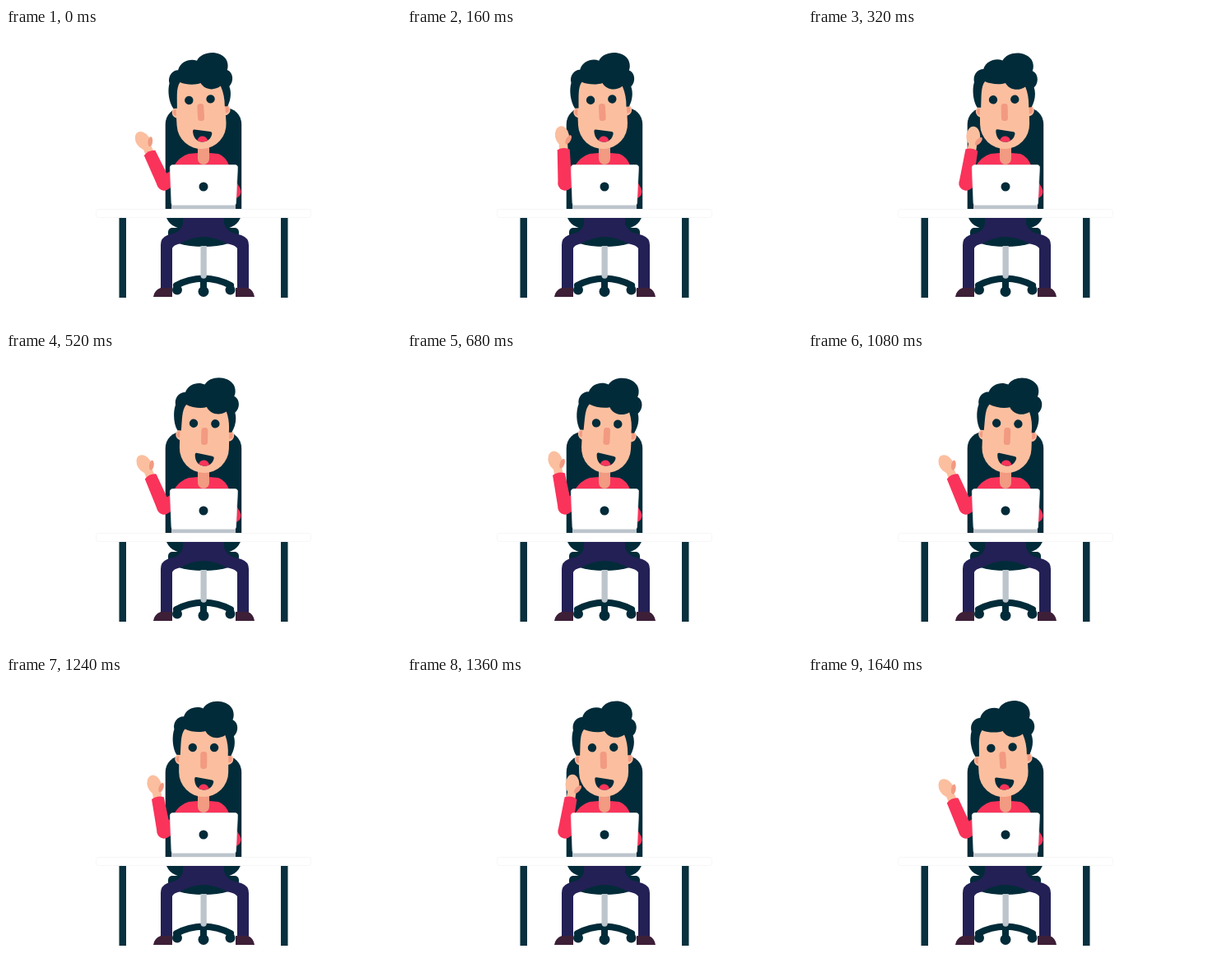
Write an HTML page that moves like this. It is 480x360 px and loops after 1.68 s.

```html
<!DOCTYPE html>
<html lang="en">
<head>
<meta charset="utf-8">
<title>Waving from the desk</title>
<style>
  html, body { margin: 0; width: 100%; height: 100%; overflow: hidden; background: #fff; }
  svg { display: block; width: 100vw; height: 100vh; }
  .dark { fill: #022b39; }
  .skin { fill: #fbbf9f; }
  .shade { fill: #f29a82; }
  .red { fill: #fa335a; }
  .navy { fill: #232055; }
  .shoe { fill: #3d1f38; }
  .grey { fill: #bcc5cc; }
  .sleeve { fill: none; stroke: #fa335a; stroke-width: 17; stroke-linecap: round; }
  .base { fill: none; stroke: #022b39; stroke-width: 8; stroke-linecap: round; }
</style>
</head>
<body>
<svg viewBox="0 0 480 360">
  <defs>
    <path id="lips" d="M231 123 L250 126.500 Q252.500 127 252 129.500 C250.500 135.500 246 139 239.500 138.500
      C232.500 138 229 132 229 125 Q229 122.700 231 123 Z"/>
    <clipPath id="mouth"><use href="#lips"/></clipPath>
  </defs>

  <!-- chair -->
  <rect class="dark" x="193.700" y="97" width="92.500" height="146.500" rx="20"/>
  <rect class="dark" x="197" y="243" width="86" height="12" rx="5"/>
  <ellipse class="dark" cx="240" cy="252" rx="43" ry="14"/>
  <path class="base" d="M207 313 Q222 305 240 304.500 Q258 305 273 313 M240 305 V318"/>
  <circle class="dark" cx="208" cy="318.500" r="6"/>
  <circle class="dark" cx="272.500" cy="318.500" r="6"/>
  <circle class="dark" cx="240" cy="320.500" r="6.500"/>
  <path class="grey" d="M236.500 265 H243.800 V301 A3.650 3.650 0 0 1 236.500 301 Z"/>

  <!-- legs -->
  <path class="navy" d="M215 228 H265 V238 Q268 246 275 249 L286 252 Q295 255 295 264 V318 H281 V268
    Q279 264 268 262 Q254 254 240 254 Q226 254 212 262 Q203 264 202 268 V318 H188 V264
    Q188 255 196 252 L206 249 Q213 246 215 238 Z"/>
  <path class="shoe" d="M179 327 Q180 319 188 316 H202 V327 Z M302 327 Q301 319 294 316 H279 V327 Z"/>

  <!-- body -->
  <path class="red" d="M203 215 V169 Q211 156 222 153 L233 152 H247 L258 153 Q267 156 272 169 V215 Z"/>
  <path class="sleeve" d="M262 173 L277 199"/>
  <path class="sleeve" d="M192 189 L214 175"/>
  <path class="shade" d="M233 138 H247 V159 A7 7 0 0 1 233 159 Z"/>

  <g id="arm">
    <path class="skin" d="M-5.500 -38 L-5 -53 H5 L5.500 -38 Z"/>
    <ellipse class="skin" cx="-1" cy="-58" rx="8.500" ry="12" transform="rotate(-8 0 -58)"/>
    <ellipse class="shade" cx="6.500" cy="-53" rx="2.800" ry="6" transform="rotate(32 6.500 -53)"/>
    <path class="red" d="M-7.500 -41 Q0 -45 7.500 -41 L8.500 0 A8.500 8.500 0 0 1 -8.500 0 Z"/>
  </g>

  <g id="head">
    <circle class="skin" cx="212" cy="101" r="7"/>
    <circle class="skin" cx="269" cy="101" r="7"/>
    <circle class="shade" cx="210.500" cy="101" r="4"/>
    <circle class="shade" cx="270.500" cy="101" r="4"/>
    <path class="skin" d="M210 62 H270 V117 A30 30 0 0 1 210 117 Z"/>
    <path class="dark" d="M207 96 C202 88 201 74 204 65 C202 56 209 49 215.500 49.500 C219 39 231 36 239 39.500
      C245 28.500 266 27.500 274 39 C276.500 43 277 49 275 53 C282 56 283 67 276.500 73 C279 81 277 90 273 97
      H269.500 C270 88 269 80 266 72 C257 78 246 75 242 67 C235 69 224 68 217 64.500
      C211.500 71 212.500 84 211.500 96 Z"/>
    <rect class="shade" x="236" y="92" width="8" height="21" rx="3.500"/>
    <g id="eyes" class="dark">
      <circle cx="226.500" cy="87" r="5.200"/>
      <circle cx="252.800" cy="87" r="5.200"/>
    </g>
    <use href="#lips" class="dark"/>
    <ellipse class="red" cx="240" cy="138" rx="6.500" ry="6.500" clip-path="url(#mouth)"/>
  </g>

  <!-- laptop -->
  <path class="grey" d="M201 213 H279 V221 H201 Z"/>
  <path d="M203 166.500 H278 Q282 166.500 281.500 170.500 L279.500 213 Q279.300 215.500 277 215.500
    H203.500 Q201.200 215.500 201 213 L199.300 170.500 Q199 166.500 203 166.500 Z" fill="#fff" stroke="#e3e7ea" stroke-width=".7"/>
  <circle class="dark" cx="240" cy="193" r="5.500"/>

  <!-- table -->
  <rect x="137.500" y="229" width="8.500" height="99" fill="#08303e"/>
  <rect x="334" y="229" width="8.500" height="99" fill="#08303e"/>
  <rect x="109.500" y="220.500" width="261" height="10" rx="3" fill="#fff" stroke="#f6f6f7"/>
</svg>
<script>
  const LOOP = 1680, WAVE = LOOP / 3;
  const [arm, head, eyes] = ['arm', 'head', 'eyes'].map(id => document.getElementById(id));
  const swing = (t, period) => -Math.cos(t / period * 2 * Math.PI);

  // Eyelid height: closes over 760-840 ms, reopens by 960 ms.
  function lid(t) {
    if (t <= 760 || t >= 960) return 1;
    return t < 840 ? 1 - 0.9 * (t - 760) / 80 : 0.1 + 0.9 * (t - 840) / 120;
  }

  function draw(t) {
    arm.setAttribute('transform', `translate(192 189) rotate(${-6.8 + 18.4 * swing(t, WAVE)})`);
    head.setAttribute('transform', `rotate(${3.4 * swing(t, LOOP)} 240 158)`);
    eyes.setAttribute('transform', `translate(0 87) scale(1 ${lid(t)}) translate(0 -87)`);
  }

  const start = performance.now();
  function tick() {
    draw((performance.now() - start) % LOOP);
    requestAnimationFrame(tick);
  }
  tick();
</script>
</body>
</html>
```
